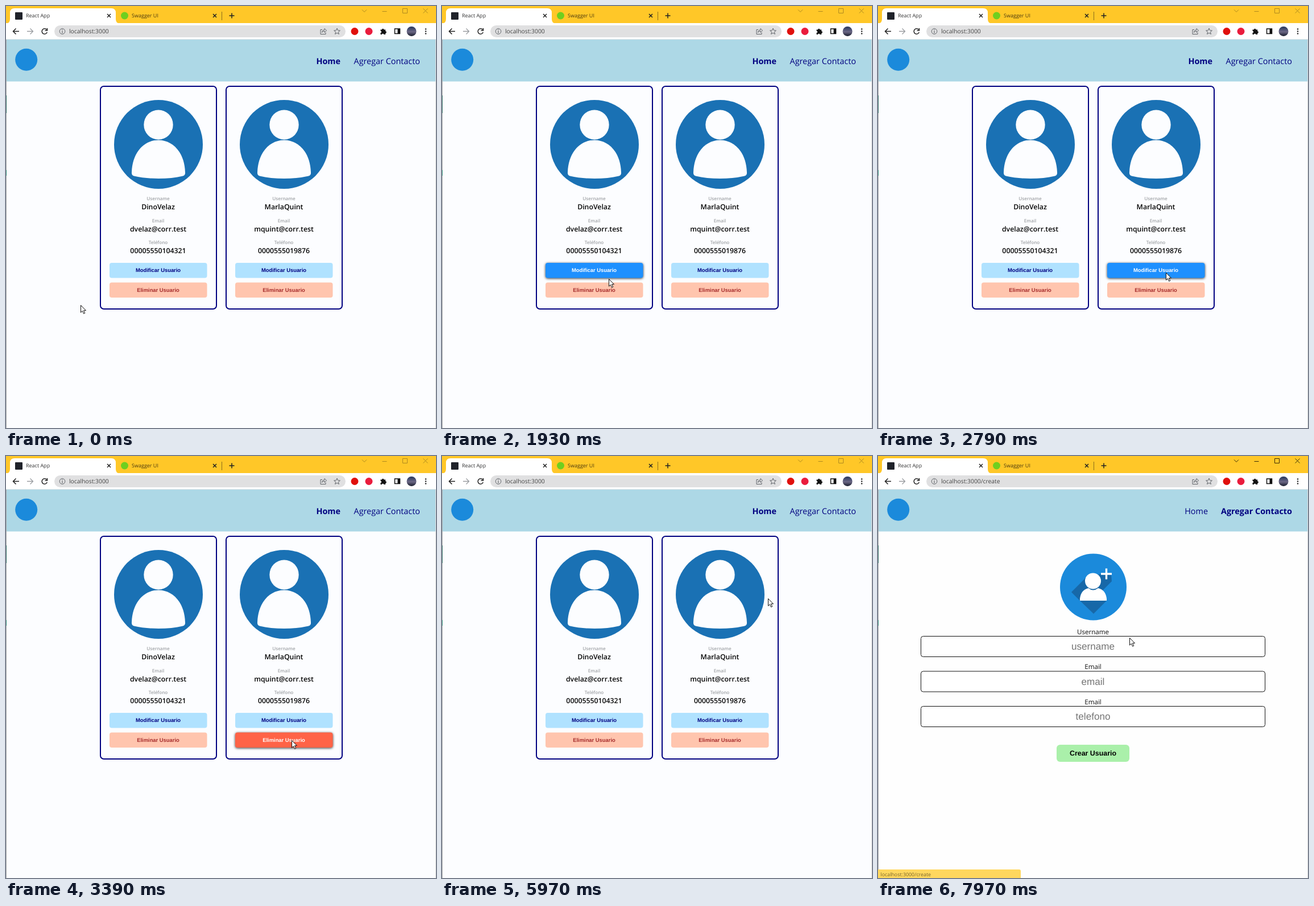
Write an HTML page that moves like this. It is 756x741 px and loops after 8 s.

```html
<!DOCTYPE html>
<html lang="es">
<head>
<meta charset="utf-8">
<title>React App</title>
<style>
html, body { margin: 0; width: 100%; height: 100%; overflow: hidden; background: #fcfdff; }
svg { display: block; width: 756px; height: 741px; text-rendering: geometricPrecision; }
text { font-family: "Open Sans", "Noto Sans", sans-serif; }
.arial { font-family: "Liberation Sans", Arial, sans-serif; }
.line { fill: none; stroke: #222; stroke-width: 1.5; }
.thin { fill: none; stroke: #5f6368; stroke-width: 1; }
.hot rect { filter: drop-shadow(0 1px 2px #000c); }
</style>
</head>
<body>
<svg id="stage" viewBox="0 0 756 741" xmlns="http://www.w3.org/2000/svg"></svg>
<script>
const LOOP = 8000;
const NAVY = '#000080';

// Bursts of pointer movement: first step, last step, number of steps.
const BURSTS = [
  [0, 840, 8], [960, 1680, 7], [1800, 2170, 4], [2310, 3030, 7], [3150, 3870, 7],
  [4380, 4740, 4], [4880, 5600, 7], [5970, 6570, 6], [6710, 7190, 5], [7730, 7970, 3]
];

// Pointer path: time, x, y.
const PATH = [
  [0, 131, 525], [240, 122, 440], [480, 103, 327], [840, 104, 408], [1200, 172, 418],
  [1440, 240, 448], [1680, 280, 462], [1930, 293, 479], [2170, 305, 498], [2310, 335, 502],
  [2550, 440, 496], [2790, 506, 468], [3030, 514, 470], [3390, 502, 499], [3630, 420, 480],
  [3870, 351, 423], [4380, 416, 386], [4740, 606, 194], [5000, 656, 113], [5240, 580, 220],
  [5600, 427, 373], [5970, 573, 250], [6330, 630, 150], [6570, 655, 97], [7070, 662, 98],
  [7190, 662, 98], [7730, 622, 138], [7970, 442, 319]
];

const CARDS = [
  { x: 0, name: 'DinoVelaz', mail: 'dvelaz@corr.test', phone: '00005550104321' },
  { x: 221, name: 'MarlaQuint', mail: 'mquint@corr.test', phone: '0000555019876' }
];

const BUTTONS = [
  { y: 451, label: 'Modificar Usuario', fill: '#b0e2ff', ink: NAVY, hot: '#1e90ff' },
  { y: 485.5, label: 'Eliminar Usuario', fill: '#ffc5ae', ink: '#a52a2a', hot: '#ff6347' }
];

const text = (x, y, size, str, extra = '') =>
  `<text x="${x}" y="${y}" font-size="${size}" ${extra}>${str}</text>`;
const mid = (x, y, size, str, extra = '') => text(x, y, size, str, 'text-anchor="middle" ' + extra);
const rect = (x, y, w, h, fill, extra = '') =>
  `<rect x="${x}" y="${y}" width="${w}" height="${h}" fill="${fill}" ${extra}/>`;
const circle = (x, y, r, fill, extra = '') =>
  `<circle cx="${x}" cy="${y}" r="${r}" fill="${fill}" ${extra}/>`;
const path = (d, extra = 'class="line"') => `<path d="${d}" ${extra}/>`;
const cross = (x, y, r) => `M${x - r} ${y - r}l${2 * r} ${2 * r}m0 ${-2 * r}l${-2 * r} ${2 * r}`;

function chrome() {
  return rect(0, 0, 756, 31, '#ffc728') +
    path('M0 30.5Q7 30.5 7 23V12Q7 4 15 4H185Q193 4 193 12V23Q193 30.5 200 30.5Z', 'fill="#fff"') +
    rect(0, 30, 756, 28.5, '#fff') + rect(0, 58, 756, 1, '#dfe3e6') +
    rect(16, 11, 13, 13, '#20232a', 'rx="1"') +
    text(35, 20, 9, 'React App', 'fill="#333"') +
    path(cross(181, 17, 3)) +
    circle(208.5, 17, 6.5, '#6fcf1f') +
    text(221, 20, 9, 'Swagger UI', 'fill="#4a3b10"') +
    path(cross(367, 17, 3)) +
    path('M379.5 10V25', 'stroke="#8a6d1a"') +
    path('M397 12.5V21.5M392.5 17H401.5') +
    `<g id="controls" fill="none" stroke-width="1">` +
    path('M626 6.5l4 4l4-4M661.5 9.5h8M697.5 4.5h8v8h-8z' + cross(737.5, 8.5, 4), '') + '</g>' +
    path('M23 44.5H13M17.5 39.5l-5 5l5 5') +
    path('M37 44.5H47M42.5 39.5l5 5l-5 5', 'fill="none" stroke="#9a9da1" stroke-width="1.3"') +
    path('M71.5 41.5A4.7 4.7 0 1 0 72.3 46M72.5 39v4h-4') +
    rect(85, 34, 512, 21, '#e0e0e1', 'rx="10.5"') +
    circle(99, 44.5, 4.8, 'none', 'stroke="#5f6368"') + path('M99 43.8V47.5M99 41.3V42.6', 'stroke="#5f6368" stroke-width="1.2"') +
    text(111, 48.2, 10.35, '', 'id="url" fill="#444"') +
    path('M556 41.5H553V49.5H562V46.5M555.5 46.5Q556 42 560 42V39.5L563.5 43L560 46.5V44Q557 44 555.5 46.5Z', 'class="thin"') +
    path('M582 39.2l1.5 3.6l3.9.3l-3 2.5l1 3.8l-3.4-2.1l-3.4 2.1l1-3.8l-3-2.5l3.9-.3z', 'class="thin"') +
    circle(613, 44.5, 6.5, '#e0100c') + circle(638, 44.5, 6.5, '#ea1c3c') +
    path('M658.5 41.5h2.5a1.7 1.7 0 1 1 3.4 0h2.8v2.8a1.7 1.7 0 1 1 0 3.4v2.3h-3a1.6 1.6 0 0 0-3.2 0h-2.5v-3a1.6 1.6 0 0 0 0-3.2z', 'fill="#111"') +
    rect(683.5, 40, 9, 8.5, 'none', 'stroke="#111" stroke-width="1.5"') + rect(688.5, 40, 4, 8.5, '#111') +
    circle(713, 44.5, 8.5, 'url(#dusk)') +
    [40.5, 44.5, 48.5].map(y => circle(738, y, 1.2, '#222')).join('');
}

function button(b, card, i) {
  return `<g class="btn" data-i="${i}" data-x="${card.x + 182}">` +
    rect(card.x + 182, b.y, 171.5, 26.5, b.fill, 'rx="4"') +
    mid(card.x + 267.5, b.y + 16.3, 9.38, b.label, `class="arial" font-weight="700" fill="${b.ink}"`) + '</g>';
}

function card(c) {
  const x = c.x + 267.5;
  const row = (y, label, value) =>
    mid(x, y, 8.1, label, 'font-weight="600" fill="#a0a3a6"') +
    mid(x, y + 15.7, 12.3, value, 'font-weight="600" fill="#050505"');
  return rect(c.x + 166, 141, 204, 391, '#fcfdff', `rx="6" stroke="${NAVY}" stroke-width="2"`) +
    `<g transform="translate(${x + .5} 243)">` + circle(0, 0, 78, '#1a71b4') +
    `<ellipse cy="-34.5" rx="25.7" ry="26" fill="#fcfdff"/>` +
    path('M-47 49C-46 15-26-7.500 0-7.500S46 15 47 49Q47.500 54 43 55.500Q24 60 0 60T-43 55.500Q-47.500 54-47 49Z', 'fill="#fcfdff"') + '</g>' +
    row(341, 'Username', c.name) + row(380, 'Email', c.mail) + row(418.2, 'Teléfono', c.phone) +
    BUTTONS.map((b, i) => button(b, c, i)).join('');
}

function form() {
  const field = (y, label, hint) =>
    mid(378, y - 3.5, 11.6, label, 'fill="#111"') +
    rect(75.5, y + .5, 605, 36, '#fff', 'rx="4" stroke="#111"') +
    mid(378, y + 24, 17.1, hint, 'class="arial" fill="#757575"');
  return rect(1, 133, 755, 608, '#fefefe') +
    circle(378.5, 230, 58.500, '#1b8adb') +
    path('M355 254L340 239L368 211L394 207L410 208L411 220L393 238L402 254L379 277Z', 'fill="#17639f" opacity=".85"') +
    circle(378, 219.500, 14, '#fff') +
    path('M355 254V250Q357 235 370 232Q378 239 387 232Q400 235 402 250V254Z', 'fill="#fff"') +
    path('M401.500 197.500V216.500M392 207H411', 'stroke="#fff" stroke-width="3.400"') +
    field(316, 'Username', 'username') + field(377.5, 'Email', 'email') + field(439, 'Email', 'telefono') +
    rect(314, 507, 128, 30, '#aaf0aa', 'rx="6"') +
    mid(378, 526, 12.4, 'Crear Usuario', 'class="arial" font-weight="700" fill="#000"');
}

const stage = document.getElementById('stage');
stage.innerHTML =
  `<defs><linearGradient id="dusk" x2="0" y2="1"><stop stop-color="#25355c"/>
  <stop offset=".55" stop-color="#6b6784"/><stop offset="1" stop-color="#171b2b"/></linearGradient></defs>` +
  rect(0, 0, 756, 741, '#fcfdff') + chrome() +
  `<g id="list">${CARDS.map(card).join('')}</g><g id="form">${form()}</g>` +
  rect(0, 59, 756, 73.5, '#add8e6') + circle(35.7, 94.3, 19.5, '#1b8adb') +
  text(0, 102, 14.4, 'Home', `id="home" text-anchor="end" fill="${NAVY}"`) +
  text(728, 102, 14.4, 'Agregar Contacto', 'id="add" text-anchor="end"') +
  rect(0, 59, 1, 682, '#a5a8aa') + rect(755, 59, 1, 682, '#d9dadb') +
  rect(0, 157, 1, 31, '#2f6b62') + rect(0, 288, 1, 10, '#2f8a78') +
  `<g id="status">` + path('', 'id="bubble"') +
  text(4.500, 737.700, 8.86, 'localhost:3000/create', 'id="link" fill="#3d3211"') + '</g>' +
  `<g id="pointer">` +
  path('M.5.5V13.200L3.400 10.500L5.600 15.300L7.700 14.300L5.500 9.700H9.500Z', 'id="arrow" fill="#fff" stroke="#111" stroke-linejoin="round"') +
  path('M3.500 1.500Q5 .3 6.200 1.500V6Q8 5.500 8.500 6.800Q10.300 6.300 10.700 7.600Q12.400 7.400 12.500 9V13Q12 15.500 11 17.500H4.500Q3 14.500 .3 11.500Q-1 9.500 .8 9Q2.200 9 3.500 11Z',
    'id="hand" fill="#fff" stroke="#111" stroke-linejoin="round"') + '</g>';

const $ = id => document.getElementById(id);
const show = (el, on) => el.setAttribute('visibility', on ? 'visible' : 'hidden');
const set = (el, attrs) => { for (const k in attrs) el.setAttribute(k, attrs[k]); };
const buttons = [...document.querySelectorAll('.btn')];

function snap(t) {
  const [start, end, n] = BURSTS.filter(b => b[0] <= t).pop();
  const gap = (end - start) / (n - 1);
  return start + Math.min(n - 1, Math.floor((t - start) / gap + 0.09)) * gap;
}

function pointerAt(t) {
  const i = Math.max(1, PATH.findIndex(p => p[0] >= t));
  const [a, b] = [PATH[i - 1], PATH[i]];
  const k = (t - a[0]) / (b[0] - a[0]);
  return [1, 2].map(j => Math.round(a[j] + (b[j] - a[j]) * k));
}

function render(time) {
  const t = snap(time);
  const [x, y] = pointerAt(t);
  const created = t >= 7180;
  const active = t >= 6940;
  const overLink = x > 611 && x < 728 && y > 84 && y < 112;

  show($('list'), !created);
  show($('form'), created);
  $('url').textContent = 'localhost:3000' + (created ? '/create' : '');
  set($('controls'), { stroke: active ? '#3a2c05' : '#b08a1e' });
  set($('home'), { x: created ? 580 : 588, 'font-weight': created ? 400 : 700 });
  set($('add'), { fill: overLink ? '#fff' : NAVY, 'font-weight': created ? 700 : 400 });

  for (const el of buttons) {
    const b = BUTTONS[el.dataset.i], left = +el.dataset.x;
    const hot = !created && x >= left && x <= left + 172 && y >= b.y && y <= b.y + 28;
    el.classList.toggle('hot', hot);
    set(el.firstChild, { fill: hot ? b.hot : b.fill });
    set(el.lastChild, { fill: hot ? '#fff' : b.ink });
  }

  const fading = t >= 7730;
  show($('status'), t >= 6700);
  set($('bubble'), {
    d: `M0 726H${fading ? 248 : 95}q3 0 3 3V741H0Z`,
    fill: fading ? '#ffd75e' : '#ffc728'
  });
  set($('link'), { fill: fading ? '#77652c' : '#3d3211' });

  set($('pointer'), { transform: `translate(${x} ${y})` });
  show($('arrow'), !overLink);
  show($('hand'), overLink);
}

const origin = performance.now();
function tick(now) {
  render(Math.max(0, now - origin) % LOOP);
  requestAnimationFrame(tick);
}
render(0);
requestAnimationFrame(tick);
</script>
</body>
</html>
```
